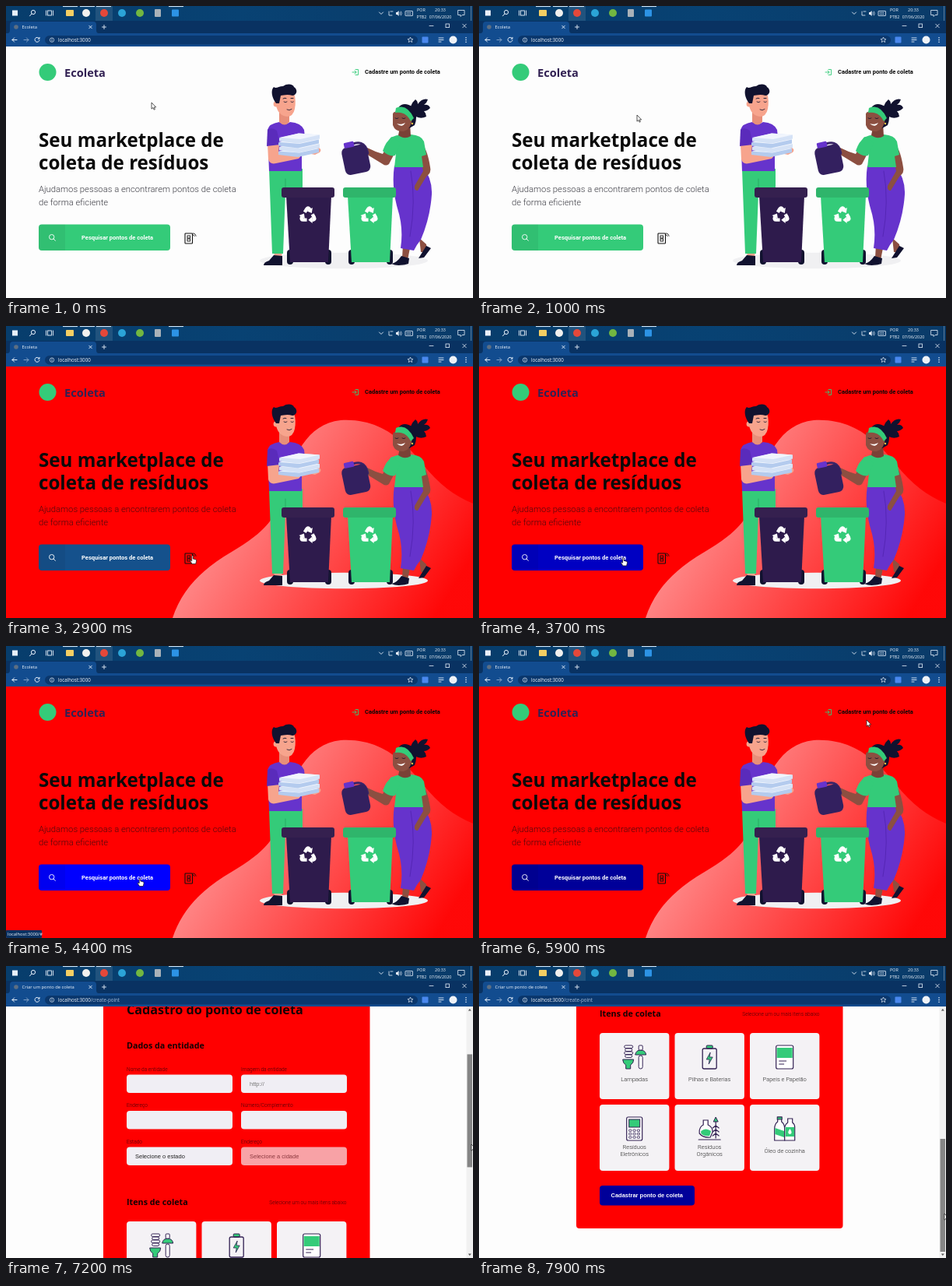
An HTML page for the animation above (8000 ms loop, 600 by 375 pixels).

```html
<!DOCTYPE html>
<html lang="pt-BR">
<head>
<meta charset="utf-8">
<title>Ecoleta</title>
<style>
  html, body { margin: 0; width: 100%; height: 100%; overflow: hidden; background: #fdfdfd; }
  svg { display: block; width: 100vw; height: 100vh; }
  text { font: 400 7.5px Roboto, sans-serif; }
  .title { font-family: "Open Sans", sans-serif; font-weight: 700; }
  .light { font-weight: 300; }
  .bold { font-weight: 700; }
  .arial { font-family: "Liberation Sans", sans-serif; }
  .ui { font: 400 6.2px "Open Sans", sans-serif; fill: #f4f8fd; }
  .mid { text-anchor: middle; }
  .end { text-anchor: end; }
  .line { fill: none; stroke-linecap: round; stroke-linejoin: round; }
</style>
</head>
<body>
<svg id="stage" viewBox="0 0 600 375"></svg>
<script>
const NAVY = '#11122f', PURPLE = '#6633cc', PLUM = '#322153', GREEN = '#34cb79';
const SKIN = '#f7a48d', BROWN = '#8c4f41';
const LOOP = 8000, STEP = 100;

const rect = (x, y, w, h, fill, rx = 0, more = '') =>
  `<rect x="${x}" y="${y}" width="${w}" height="${h}" rx="${rx}" fill="${fill}" ${more}/>`;
const dot = (x, y, r, fill, more = '') => `<circle cx="${x}" cy="${y}" r="${r}" fill="${fill}" ${more}/>`;
const shape = (d, fill, more = '') => `<path d="${d}" fill="${fill}" ${more}/>`;
const line = (d, color, w = 1, more = '') =>
  `<path class="line" d="${d}" stroke="${color}" stroke-width="${w}" ${more}/>`;
const text = (s, x, y, size, cls = '', fill = '', more = '') =>
  `<text x="${x}" y="${y}" class="${cls}" style="font-size:${size}px;${fill && 'fill:' + fill}" ${more}>${s}</text>`;
const group = (id, body, more = '') => `<g id="${id}" ${more}>${body}</g>`;

function recycle(x, y) {
  const band = '<path d="M-3.5 -3.4 L-1.6 -6.7 Q0 -9 1.4 -7.1 L1.9 -6.2" fill="none" stroke="#fff" stroke-width="3.6"/>';
  const arrow = band + shape('M4.9 -8.3 L-1.4 -4.7 L4 -2.6Z', '#fff');
  return `<g transform="translate(${x} ${y}) scale(1.2)">` +
    [0, 120, 240].map(a => `<g transform="rotate(${a})">${arrow}</g>`).join('') + '</g>';
}

function bin(x, lid, body) {
  return rect(x + 7, 313, 8, 19, NAVY, 4) + rect(x + 56, 313, 8, 19, NAVY, 4) +
    shape(`M${x + 6} 244 H${x + 64} L${x + 60} 329 H${x + 11}Z`, body) +
    rect(x, 233, 68, 13, lid, 3) + recycle(x + 34, 269);
}

function man() {
  return shape('M344 314 H355 L354 323 H345Z', SKIN) +
    shape('M344 320 L355 321 L355 333 H331 Q331 329 338 327Z', NAVY) +
    shape('M338 209 H381 V240 H359 L356 318 H342Z', GREEN) +
    line('M359 222 V240', '#27a35f', .8) +
    shape('M336 159 Q338 151 351 149 Q358 154 365 149 Q379 150 383 159 L385 178 L380 181 V212 H338Z', PURPLE) +
    shape('M351 134 H364 V149 Q358 156 351 149Z', '#e88f7a') +
    shape('M347 113 Q357 109 370 112 Q373 121 371 132 Q369 142 361 142 Q350 141 347 128Z', SKIN) +
    dot(347, 126, 3.4, SKIN) +
    shape('M347 125 C341 117 340 108 344 104 C347 107 350 103 356 103 C361 99 369 100 370 104 C376 108 373 115 368 115 C361 113 356 115 353 115 L351 125Z', NAVY) +
    line('M357 123 q2 1.6 4 0 M366 123 q2 1.5 3.4 0 M361 133 q3 2 6 -.5', NAVY, .8) +
    line('M356 119 q2 -1.5 4 -.5 M366 118.5 l3 0', NAVY, .9) +
    shape('M381 178 L400 181 Q407 184 403 188 L397 191 L382 188Z', SKIN) +
    shape('M336 176 L351 178 L350 190 L376 188 Q381 191 376 196 L347 202 Q339 204 337 197Z', SKIN) +
    shape('M336 159 Q341 155 348 160 L352 178 L335 180Z', '#5a2bbb') +
    [0, 1, 2, 3].map(i => {
      const y = 191 - i * 5.8, x = 350 + i % 2;
      return shape(`M${x} ${y - 4} L${x + 25} ${y - 10} L${x + 52} ${y - 8} V${y - 3} L${x + 25} ${y + 3} L${x} ${y}Z`, i % 2 ? '#d5e2f6' : '#b4cbee') +
        shape(`M${x} ${y - 4.6} L${x + 25} ${y - 10} L${x + 52} ${y - 8} L${x + 27} ${y - 2.5}Z`, '#f1f5fd');
    }).join('');
}

function woman() {
  const head = shape('M507 154 H519 L520 170 Q512 175 504 169Z', '#7a4136') +
    shape('M503 135 Q510 124 523 133 Q530 143 525 156 L518 160 L506 150Z', NAVY) +
    shape('M520 140 Q518 130 526 123 Q529 125 529 129 Q535 121 542 123 Q541 127 537 130 Q543 129 545 134 Q541 138 537 138 Q540 141 540 145 Q530 150 520 140Z', NAVY) +
    shape('M497 141 Q504 134 516 140 L522 147 Q521 161 511 164 Q500 165 497 156Z', BROWN) +
    shape('M501 134 Q515 128 524 147 L520 151 Q514 138 500 140Z', GREEN) +
    line('M500 147 q2 1.5 4 0 M509 147 q2 1.5 4 0', NAVY, .8) +
    shape('M502 154 Q507 156 513 153 Q509 160 502 154Z', '#fff') +
    dot(522, 154, 1.2, '#f5c244');
  return shape('M510 306 H520 L516 326 L509 324Z M531 298 L540 306 L541 316 L533 316Z', BROWN) +
    shape('M508 321 L518 324 L517 331 Q503 335 495 331 Q502 330 508 321Z M540 308 L546 311 L537 323 L530 324Z', NAVY) +
    shape('M499 205 H535 Q548 222 547 242 Q545 272 533 300 Q528 306 524 314 L507 311 Q511 285 503 260 Q495 232 499 205Z', PURPLE) +
    line('M520 212 Q527 250 519 296', '#5526b5', 1) +
    shape('M532 175 Q541 181 545 207 Q547 214 540 219 L529 237 Q524 237 525 231 L536 212 L530 187Z', BROWN) +
    shape('M494 169 Q505 164 520 165 Q534 166 537 174 L540 191 L534 193 L536 207 H499 L501 190 L491 181Z', GREEN) +
    shape('M494 172 L503 182 L492 203 Q488 206 484 203 L466 192 L460 188 Q459 183 464 182 L475 187 L484 190Z', BROWN) +
    shape('M496 168 Q488 174 484 186 Q492 194 500 192 L507 176Z', GREEN) +
    `<g transform="translate(0 -3)">${head}</g>`;
}

function jug() {
  return `<g transform="rotate(-12 451 196)">` +
    line('M443 178 Q466 171 466 192', '#3a2569', 3) +
    rect(433, 179, 33, 36, '#33205f', 7) + rect(438, 173, 13, 7, PURPLE, 1.5) + '</g>';
}

function linkIcon(x, y) {
  return line(`M${x} ${y} h5 m-2 -2 l2 2 l-2 2 M${x + 4} ${y - 3.5} h3.5 v7 h-3.5`, GREEN, .9);
}

function home() {
  return rect(0, 52, 600, 323, '#fdfdfd', 0, 'id="homeBg"') +
    shape('M214 375 C226 338 252 312 290 290 C330 266 346 250 356 215 C368 168 386 126 430 121 C480 118 510 146 536 178 C556 203 576 218 600 228 V375Z', 'url(#glow)', 'id="blob"') +
    dot(53.5, 85, 11, GREEN) + text('Ecoleta', 75, 90.5, 14.6, 'title', PLUM) +
    linkIcon(445, 85) + text('Cadastre um ponto de coleta', 461, 87.4, 7.5, 'bold', '#080808') +
    text('Seu marketplace de', 42, 181, 24.15, 'title', '#0a0a0a') +
    text('coleta de resíduos', 42, 210, 24.15, 'title', '#0a0a0a') +
    group('intro', text('Ajudamos pessoas a encontrarem pontos de coleta', 42, 238.8, 11.27, 'light') +
      text('de forma eficiente', 42, 256.3, 11.27, 'light')) +
    rect(42, 280.5, 169, 33.5, GREEN, 4, 'id="search"') +
    shape('M46 280.5 H76 V314 H46 Q42 314 42 310 V284.5 Q42 280.5 46 280.5Z', '#000', 'opacity=".06"') +
    line('M61.2 299.2 l2.2 2.2', '#fff', .9) + dot(58.7, 296.7, 3.2, 'none', 'stroke="#fff" stroke-width=".9"') +
    text('Pesquisar pontos de coleta', 97, 299.6, 7.55, 'bold', '#fff') +
    rect(230, 292, 9.5, 13, 'none', .8, 'stroke="#111" stroke-width="1.1"') +
    rect(233, 295, 3.6, 3, 'none', 0, 'stroke="#111" stroke-width=".9"') +
    rect(233, 299, 3.6, 3, 'none', 0, 'stroke="#111" stroke-width=".9"') +
    line('M240.4 294 q1.5 .2 1.8 1.6 M240.4 291.8 q3.4 .3 3.8 3.6', '#111', .8) +
    `<ellipse cx="434" cy="327" rx="108" ry="10.3" fill="#f0f0f2"/>` +
    man() + woman() + jug() +
    bin(354, '#35204f', '#2e1b4c') + bin(433, '#2fb56b', GREEN);
}

// Card icons share a 30px box around their centre.
const icons = [
  [-15, -11, -7, -3].map((y, i) => rect(-13 + i % 2, y, 11 - i % 2 * 2, 3.4, '#fff', 1.7, `stroke="${PLUM}"`)).join('') +
    shape('M-15 3 H-1 Q-1 8 -5 10 V15 H-11 V10 Q-15 8 -15 3Z M1 -3 Q2 -9 8 -9 Q14 -9 15 -3Z', GREEN, `stroke="${PLUM}"`) +
    rect(5.5, -15, 5, 6, '#fff', 1, `stroke="${PLUM}"`) + rect(5.5, -2, 5, 17, '#fff', 2.5, `stroke="${PLUM}"`),
  rect(-4, -15, 8, 4, GREEN, 1, `stroke="${PLUM}"`) + rect(-9, -11, 18, 26, 'none', 2, `stroke="${PLUM}" stroke-width="1.3"`) +
    shape('M1 -6 L-4 3 H0 L-1 9 L4 0 H0Z', GREEN, `stroke="${PLUM}" stroke-width=".8"`),
  rect(-11, -15, 22, 30, '#fff', 2, `stroke="${PLUM}" stroke-width="1.2"`) + rect(-10, -12, 20, 13, GREEN) +
    line('M-7 5 h9 M-7 9 h6', PLUM, 1),
  rect(-10, -15, 20, 30, '#fff', 2, `stroke="${PLUM}" stroke-width="1.2"`) + rect(-7, -12, 14, 10, GREEN, 0, `stroke="${PLUM}"`) +
    [0, 1, 2].map(r => [0, 1, 2].map(c => rect(-7 + c * 5.3, 1 + r * 4.4, 3.2, 2.4, 'none', .4, `stroke="${PLUM}" stroke-width=".8"`)).join('')).join(''),
  shape('M-13 2 Q-12 -3 -8 -5 V-11 H-2 V-5 Q4 -2 4 4 L1 11 Q-8 12 -13 6Z', '#fff', `stroke="${PLUM}" stroke-width="1.2"`) +
    shape('M-11 3 Q-5 -2 2 3 L0 9 Q-7 10 -11 6Z', GREEN) + shape('M5 -9 L8 -15 L11 -9Z', GREEN, `stroke="${PLUM}"`) +
    line('M8 -9 V12 M4 -1 l4 -3 l4 3 M4 4 l4 -3 l4 3 M4 9 l4 -3 l4 3 M-14 14 h28', PLUM, 1.2),
  shape('M-9 -15 H-4 V-9 Q0 -6 0 0 V15 H-13 V0 Q-13 -6 -9 -9Z', '#fff', `stroke="${PLUM}" stroke-width="1.2"`) +
    shape('M-12.4 -1 L-.6 3 V11 L-12.4 7Z', GREEN) + rect(-9.5, -15, 6, 3, GREEN, 0, `stroke="${PLUM}"`) +
    shape('M4 -13 H10 V-8 Q13 -6 13 -2 V15 H0 V-2 Q1 -6 4 -8Z', '#fff', `stroke="${PLUM}" stroke-width="1.2"`) +
    rect(1, -2, 11.5, 12, GREEN) + shape('M6.7 0 Q11 6 6.7 7 Q2.5 6 6.7 0Z', '#fff')
];
const items = [['Lampadas'], ['Pilhas e Baterias'], ['Papeis e Papelão'], ['Resíduos', 'Eletrônicos'], ['Resíduos', 'Orgânicos'], ['Óleo de cozinha']];

function card(names, i) {
  const x = 155 + i % 3 * 96.5, y = 447 + Math.floor(i / 3) * 92, cx = x + 44.7;
  return rect(x, y, 89.4, 85, '#f4f2f5', 4) +
    `<g transform="translate(${cx} ${y + 31})">${icons[i]}</g>` +
    names.map((n, k) => text(n, cx, y + 61.5 + k * 8.6 - (names.length - 1) * 4.5, 7.5, 'light mid', '#222')).join('');
}

function field(label, col, row, value, fill = '#f0eef4', color = '#222') {
  const x = 155 + col * 147, y = 258.5 + row * 46.5;
  return text(label, x, y - 5, 6.56, 'light', '#3d0208') + rect(x, y, 136, 23.5, fill, 4) +
    text(value, x + 11, y + 14.6, 7.5, 'arial', color);
}

function form() {
  return dot(136, 86, 11, GREEN) + text('Ecoleta', 157, 91, 14.6, 'title', PLUM) +
    line('M399 86 h-6 m2.5 -2.5 l-2.5 2.5 l2.5 2.5', GREEN, 1) + text('Voltar para home', 467, 88.5, 7.5, 'bold end', PLUM) +
    rect(125, 134, 342.5, 564, '#ff0000', 4) +
    text('Cadastro do ponto de coleta', 155, 181, 16.2, 'title', '#160204') +
    text('Dados da entidade', 155, 225, 10.75, 'title', '#160204') +
    field('Nome da entidade', 0, 0, '') + field('Imagem da entidade', 1, 0, 'http://', '#f0eef4', '#777') +
    field('Endereço', 0, 1, '') + field('Número/Complemento', 1, 1, '') +
    field('Estado', 0, 2, 'Selecione o estado') + field('Endereço', 1, 2, 'Selecione a cidade', '#f8a2a6', '#8c3a40') +
    text('Itens de coleta', 155, 426, 10.75, 'title', '#160204') +
    text('Selecione um ou mais itens abaixo', 437.5, 424.5, 6.56, 'light end', '#3d0208') +
    items.map(card).join('') +
    rect(155, 643, 122, 25.5, '#000099', 4) +
    text('Cadastrar ponto de coleta', 169.5, 658.3, 7.5, 'arial bold', '#fff');
}

function scrollbar() {
  return rect(591.5, 52, 8.5, 323, '#f1f1f1') + shape('M593.8 57.5 h4 l-2 -2.4Z M593.8 369.5 h4 l-2 2.4Z', '#555') +
    rect(592.5, 60, 6.5, 145, '#858585', 0, 'id="thumb"');
}

function browser() {
  const white = '#e8f0fa';
  return rect(0, 0, 600, 19, 'url(#bar)') + rect(0, 19, 600, 16, '#093262') + rect(0, 35, 600, 17, '#124c8f') +
    shape('M2 35 Q5 35 5 31 V24 Q5 20 9 20 H112 Q116 20 116 24 V31 Q116 35 119 35Z', '#124c8f') +
    rect(8, 5.5, 7, 7, white) + dot(35, 8, 2.6, 'none', `stroke="${white}"`) + line('M33 10 l-2.5 2.8', white) +
    rect(53.5, 6, 5, 6, 'none', 0, `stroke="${white}" stroke-width=".9"`) + line('M51.5 6 v6 M60.5 6 v6', white, .9) +
    rect(115, 0, 22, 19, '#fff', 0, 'opacity=".1"') +
    rect(77, 5, 10, 8, '#f4cf63', 1) + dot(103, 9, 5, '#f0f0ee') + dot(126, 9, 5, '#e5483a') +
    dot(149, 9, 5, '#2ba4d6') + dot(172, 9, 5, '#72b741') + rect(191, 4, 8, 10, '#a9b2b8', 1) + rect(213, 4.5, 9, 9, '#2c93e6', 1) +
    [73, 95, 116, 209].map(x => rect(x, 0, 19, 1.1, '#cfe4f6')).join('') + rect(597, 0, .7, 19, '#7f9cb8') +
    line('M479.5 8 l2.5 2.5 l2.5 -2.5', white, .9) + line('M492 7 v5 h4 M494 7 h3', white, .8) +
    shape('M501 8 h1.6 l2 -2 v7 l-2 -2 h-1.6z', white) + line('M506 8 q1 1.5 0 3 M507.5 7 q1.8 2.5 0 5', white, .7) +
    rect(513, 6.5, 9.5, 6, 'none', .5, `stroke="${white}" stroke-width=".8"`) + line('M515 8.5 h5.5 M515 10.5 h5.5', white, .7, 'stroke-dasharray="1 1"') +
    line('M581 5.5 h8 v6 h-3 l-2 2 v-2 h-3z', white, .8) +
    text('POR', 533.5, 7.2, 5.4, 'ui mid') + text('PTB2', 534, 16, 5.4, 'ui mid') +
    text('20:33', 558, 7.2, 5.4, 'ui mid') + text('07/06/2020', 558, 16, 5.4, 'ui mid') +
    dot(13, 27, 2.8, '#5d6f83') + text('', 20.5, 29, 5.8, 'ui', '', 'id="tab"') +
    line('M106.7 25.2 l3.6 3.6 m0 -3.6 l-3.6 3.6 M123.5 27 h5 m-2.5 -2.5 v5', white, .9) +
    line('M544 25.5 h5 M586.7 23.2 l4.6 4.6 m0 -4.6 l-4.6 4.6', white, .8) + rect(565, 23, 4.6, 4.6, 'none', 0, `stroke="${white}" stroke-width=".8"`) +
    line('M14 43.5 h-6 m2.6 -2.6 l-2.6 2.6 l2.6 2.6', white) + line('M23 43.5 h6 m-2.6 -2.6 l2.6 2.6 l-2.6 2.6', '#7f9fc5') +
    line('M42.5 41.5 a3 3 0 1 0 .5 2.5 M43 40.3 v1.8 h-1.8', white) +
    rect(50, 38, 479, 11.4, '#0a376d', 5.7) + dot(59, 43.6, 2.7, 'none', 'stroke="#c9d8ea" stroke-width=".8"') + line('M59 43.2 v1.6 M59 42 v.1', '#c9d8ea', .8) +
    `<text x="67" y="45.6" class="ui">localhost:3000<tspan id="path" fill="#a9bfdb"></tspan></text>` +
    shape('M519.5 40 l1 2.3 2.5 .2 -1.9 1.6 .6 2.4 -2.2 -1.3 -2.2 1.3 .6 -2.4 -1.9 -1.6 2.5 -.2z', 'none', `stroke="${white}" stroke-width=".7"`) +
    rect(534.5, 39.5, 8, 8, '#4a88ee', 1) + line('M556 41 h6 M556 43.5 h6 M556 46 h3', white, .9) + dot(574.5, 43.5, 5, '#eef2f7') +
    [40.8, 43.5, 46.2].map(y => dot(591, y, .8, white)).join('');
}

const pointers = {
  arrow: shape('M0 0 V8.2 L1.9 6.5 L3.1 9.2 L4.4 8.6 L3.2 6 H5.7Z', '#fff', 'stroke="#111" stroke-width=".7"'),
  beam: line('M-1.6 -3.8 Q0 -3.8 0 -3 V3 Q0 3.8 -1.6 3.8 M1.6 -3.8 Q0 -3.8 0 -3 M0 3 Q0 3.8 1.6 3.8', '#222', .8),
  hand: shape('M-.8 .8 Q0 -.6 .8 .8 V4 L4.6 5 Q5.4 5.4 5 7.2 L4.2 10.5 H-.4 L-3 6.6 Q-2.6 5.4 -.8 6.8Z', '#fff', 'stroke="#111" stroke-width=".7"')
};

const stage = document.getElementById('stage');
stage.innerHTML =
  `<defs><linearGradient id="glow" gradientUnits="userSpaceOnUse" x1="300" y1="200" x2="560" y2="360"><stop offset="0" stop-color="#fff" stop-opacity=".54"/><stop offset="1" stop-color="#fff" stop-opacity=".03"/></linearGradient>
  <linearGradient id="bar"><stop offset="0" stop-color="#073d6c"/><stop offset=".5" stop-color="#084273"/><stop offset="1" stop-color="#0a3b69"/></linearGradient></defs>` +
  group('home', home()) +
  group('point', rect(0, 52, 600, 323, '#fdfdfd') + group('form', form()) + scrollbar()) +
  browser() +
  group('status', rect(0, 365, 46, 10, '#0a3161', 1, 'id="statusBox"') + text('', 2, 372.3, 5.8, 'ui', '', 'id="statusText"')) +
  group('cursor', Object.entries(pointers).map(([k, v]) => group(k, v)).join(''));

const $ = id => document.getElementById(id);
const show = (id, on) => $(id).setAttribute('display', on ? 'inline' : 'none');
const clamp = v => Math.max(0, Math.min(1, v));
const ease = p => p * p * (3 - 2 * p);
const mix = (a, b, p) => a.map((v, i) => v + (b[i] - v) * p);
const rgb = c => `rgb(${c.map(Math.round)})`;

// Keys are [time, ...values].
function at(keys, t, curve = ease) {
  const i = keys.findIndex(k => k[0] > t);
  if (i === 0) return keys[0].slice(1);
  if (i < 0) return keys[keys.length - 1].slice(1);
  const a = keys[i - 1], b = keys[i];
  return mix(a.slice(1), b.slice(1), curve((t - a[0]) / (b[0] - a[0])));
}

const mouse = [
  [0, 187, 124], [100, 187, 124], [700, 203, 140], [1300, 203, 140], [2100, 246, 241], [2600, 239.5, 295], [3200, 239.5, 295],
  [3900, 172, 298], [4800, 172, 298], [5900, 498, 95], [6100, 506, 86], [6350, 506, 86], [6750, 598, 170], [7200, 598, 229], [7800, 598, 318]
];
const scroll = [[6800, 0], [7200, 119], [7750, 361]];
const THEME = 2780, HOVER = 3620, LEAVE = 5000, LINK = 6000, OPEN = 6300;

function draw(t) {
  const red = t >= THEME, open = t >= OPEN;
  const [x, y] = at(mouse, t);
  show('home', !open);
  show('point', open);

  $('homeBg').setAttribute('fill', red ? '#ff0000' : '#fdfdfd');
  show('blob', red);
  $('intro').setAttribute('fill', red ? '#4d080c' : '#3c3c44');
  const themed = mix([52, 203, 121], [0, 0, 153], clamp((t - THEME) / 200));
  const hover = clamp((t - HOVER) / 200) - clamp((t - LEAVE) / 200);
  $('search').setAttribute('fill', rgb(mix(themed, [0, 0, 255], hover)));

  const [top] = at(scroll, t, p => p);
  $('form').setAttribute('transform', `translate(0 ${-top})`);
  $('thumb').setAttribute('y', 60 + top / 361 * 162);

  $('tab').textContent = open ? 'Criar um ponto de coleta' : 'Ecoleta';
  $('path').textContent = open ? '/create-point' : '';

  const onButton = t >= 4000 && t < LEAVE + 100, onLink = t >= LINK + 150 && !open;
  show('status', onButton || onLink);
  $('statusBox').setAttribute('width', onLink ? 80 : 46);
  $('statusText').textContent = 'localhost:3000/' + (onLink ? 'create-point' : '#');

  const inside = (l, u, r, b) => !open && x >= l && x <= r && y >= u && y <= b;
  const kind = inside(42, 280, 211, 314) || inside(228, 290, 246, 307) || inside(444, 80, 560, 91) ? 'hand'
    : inside(42, 158, 300, 260) ? 'beam' : 'arrow';
  for (const k in pointers) show(k, k === kind);
  $('cursor').setAttribute('transform', `translate(${x} ${y})`);
}

const start = performance.now();
function tick() {
  const t = (performance.now() - start) % LOOP;
  draw(Math.floor(t / STEP) * STEP);
  requestAnimationFrame(tick);
}
tick();
</script>
</body>
</html>
```
